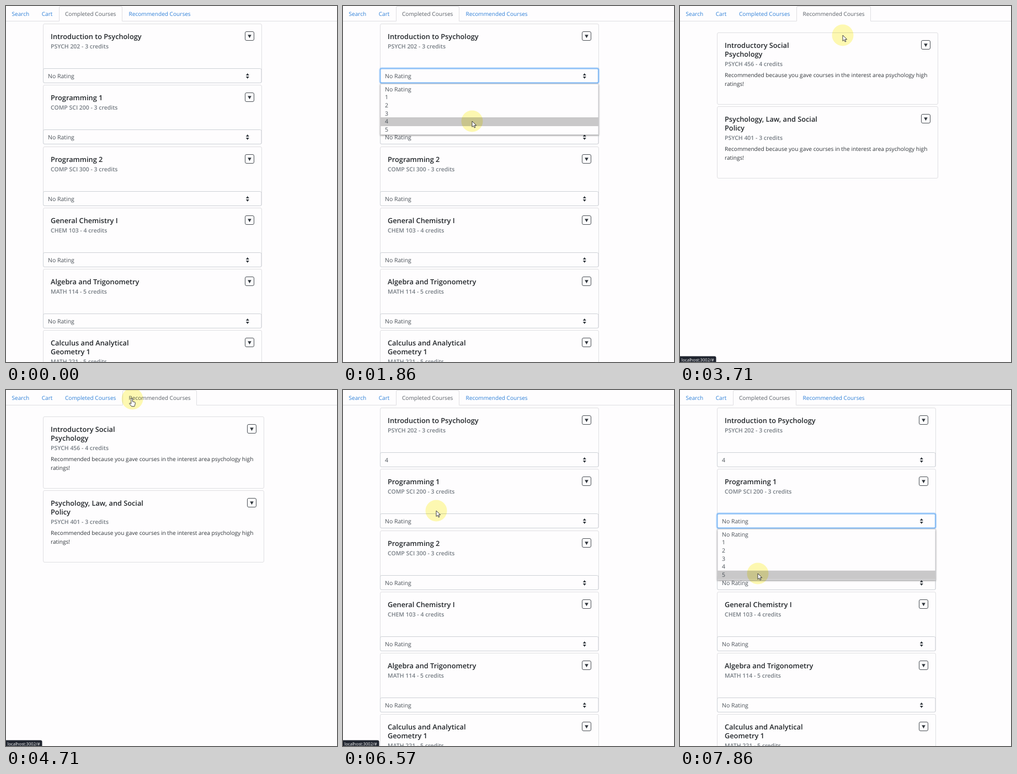
An HTML page for the animation above (8 s loop, 600 by 646 pixels).

```html
<!DOCTYPE html>
<html lang="en">
<head>
<meta charset="utf-8">
<title>Course planner</title>
<style>
  html, body { margin: 0; width: 100%; height: 100%; overflow: hidden; background: #fefdfe; }
  svg { display: block; width: 100%; height: 100%; }
  text { font: 10.5px "Open Sans", "Noto Sans", sans-serif; fill: #495057; text-rendering: geometricPrecision; white-space: pre; }
  .title { font-size: 12.75px; font-weight: 600; fill: #212529; }
  .sub { font-size: 10.48px; font-weight: 600; fill: #747b82; }
  .body { font-size: 10.15px; fill: #30353a; }
  .tab { font-size: 10.1px; fill: #2f80d8; }
  .tab.on { fill: #5a6067; }
  .status { font-size: 7.65px; fill: #fff; }
  .box { fill: none; stroke: #dfdfe2; }
  .select { fill: #fefdfe; stroke: #cdd1d6; }
  .raised { fill: #fefdfe; stroke: #cfcfd2; filter: url(#shadow); }
  .dark { fill: #343a40; }
  .bubble { fill: #20252f; }
  .btn { fill: none; stroke: #4a4f55; }
  .focus { fill: none; stroke: #7db9f5; stroke-width: 1.4; }
  .glow { fill: none; stroke: #2f8cf5; stroke-opacity: .3; stroke-width: 3.4; }
  .spot { fill: #fefab2; mix-blend-mode: multiply; }
  .ring { fill: none; stroke: #e5403c; stroke-width: 2.6; }
  .pointer { fill: #fff; stroke: #2a2a2a; stroke-width: .9; stroke-linejoin: round; }
</style>
</head>
<body>
<svg id="stage" viewBox="0 0 600 646">
  <defs>
    <filter id="shadow" x="-5%" y="-15%" width="110%" height="130%">
      <feDropShadow dx="0" dy="1" stdDeviation="1.8" flood-color="#000" flood-opacity=".45"/>
    </filter>
  </defs>
</svg>
<script>
const STEP = 1000 / 7, STEPS = 56, PITCH = 111.25, ROW = 14.7;

const courses = [
  [['Introduction to Psychology'], 'PSYCH 202 - 3 credits'],
  [['Programming 1'], 'COMP SCI 200 - 3 credits'],
  [['Programming 2'], 'COMP SCI 300 - 3 credits'],
  [['General Chemistry I'], 'CHEM 103 - 4 credits'],
  [['Algebra and Trigonometry'], 'MATH 114 - 5 credits'],
  [['Calculus and Analytical', 'Geometry 1'], 'MATH 221 - 5 credits']
];
const picks = [
  [['Introductory Social', 'Psychology'], 'PSYCH 456 - 4 credits'],
  [['Psychology, Law, and Social', 'Policy'], 'PSYCH 401 - 3 credits']
];
const ratings = ['No Rating', '1', '2', '3', '4', '5'];

// Pointer path: step, x, y
const path = [
  [1, 515, 8], [2, 508, 150], [3, 465, 340], [4, 405, 500], [5, 375, 430],
  [6, 350, 310], [7, 329, 185], [8, 325, 121], [9, 325, 121], [11, 272, 178],
  [13, 234, 209], [16, 230, 209], [17, 226, 250], [18, 222, 281], [19, 222, 281],
  [20, 218, 149], [21, 232, 80], [22, 252, 24], [23, 260, 16], [25, 260, 16],
  [27, 330, 90], [29, 491, 150], [31, 350, 60], [32, 255, 22], [33, 229, 16],
  [35, 212, 16], [37, 186, 20], [39, 181, 37], [40, 178, 24], [43, 177, 23],
  [44, 176, 52], [45, 172, 124], [46, 169, 219], [48, 155, 243], [51, 150, 247],
  [52, 144, 300], [53, 141, 333], [55, 141, 333]
];
const clicks = [8, 15, 24, 41, 49];

const stage = document.getElementById('stage');

function add(parent, tag, attrs = {}, content) {
  const el = document.createElementNS('http://www.w3.org/2000/svg', tag);
  for (const key in attrs) el.setAttribute(key, attrs[key]);
  if (content) el.textContent = content;
  return parent.appendChild(el);
}
const group = (parent, y = 0) => add(parent, 'g', { transform: `translate(0 ${y})` });
const text = (p, cls, x, y, s) => add(p, 'text', { class: cls, x, y }, s);
const rect = (p, cls, x, y, width, height, rx = 0) =>
  add(p, 'rect', { class: cls, x, y, width, height, rx });
const shape = (p, cls, d) => add(p, 'path', { class: cls, d });
const show = (el, on) => { el.style.display = on ? '' : 'none'; };
const within = (k, a, b) => k >= a && k < b;

function heading(p, [lines, sub], y, buttonX) {
  lines.forEach((s, i) => text(p, 'title', 81, y + 16 * i, s));
  text(p, 'sub', 81, y + 17.5 + 16 * (lines.length - 1), sub);
  rect(p, 'btn', buttonX - 8, y - 13, 16, 16, 2.5);
  shape(p, 'dark', `M${buttonX - 3.3} ${y - 7.2}h6.6l-3.3 6z`);
}

function makeTabs(parent, active) {
  const [a, b] = active === 2 ? [96.5, 210.5] : [211.5, 345.5];
  shape(parent, 'box', `M0 27.5H${a}V3q0-2.5 2.5-2.5H${b - 2.5}q2.5 0 2.5 2.5V27.5H600`);
  [['Search', 10.5], ['Cart', 64.7], ['Completed Courses', 107], ['Recommended Courses', 222.5]]
    .forEach(([s, x], i) => text(parent, i === active ? 'tab on' : 'tab', x, 18.2, s));
}

function makeCourse(parent, course, i) {
  const g = group(parent, Math.round(PITCH * i));
  rect(g, 'box', 67.5, 32.5, 396, 107, 2.5);
  rect(g, 'select', 67.5, 113.5, 395.5, 26, 2.5);
  const value = text(g, '', 76, 130.7, ratings[0]);
  shape(g, 'dark', 'M434.8 126l3-4 3 4zM434.8 128l3 4 3-4z');
  const focus = group(g);
  rect(focus, 'glow', 67, 113, 396.5, 27, 3);
  rect(focus, 'focus', 67.5, 113.5, 395.5, 26, 2.5);
  const hover = group(g);
  rect(hover, 'raised', 67.5, 32.5, 396, 88.5, 2.5);
  shape(hover, 'box', 'M68 114.5H463');
  heading(g, course, 59.5, 441.5);
  return { value, focus, hover };
}

const completed = group(stage);
makeTabs(completed, 2);
const cards = courses.map((c, i) => makeCourse(completed, c, i));

const recommended = group(stage);
makeTabs(recommended, 3);
picks.forEach((c, i) => {
  const g = group(recommended, 134 * i);
  rect(g, 'box', 67.5, 48.5, 400, 130, 2.5);
  heading(g, c, 75.5, 445.5);
  text(g, 'body', 81, 129, 'Recommended because you gave courses in the interest area psychology high');
  text(g, 'body', 81, 145, 'ratings!');
});

const popup = group(stage);
rect(popup, 'raised', 68, 141.5, 395, 92);
const marker = add(popup, 'rect', { x: 68, width: 395, height: 16, fill: '#c9c8c9' });
ratings.forEach((s, i) => text(popup, '', 76, 154.6 + ROW * i, s));

const status = group(stage);
shape(status, 'bubble', 'M0 635.5H62.5q3 0 3 3V646H0z');
text(status, 'status', 2.5, 644.7, 'localhost:3002/#');

const spot = add(stage, 'circle', { class: 'spot', r: 19.5 });
const pointer = group(stage);
const ring = add(pointer, 'circle', { class: 'ring', r: 4.4 });
const arrow = shape(pointer, 'pointer', 'M0 0v10.5l2.5-2.3 1.7 3.8 1.7-.8-1.7-3.6h3.5z');
const hand = shape(pointer, 'pointer',
  'M-2.2 9V.3a1.3 1.3 0 0 1 2.6 0V5l3.6.8q1.5.4 1.3 2l-.6 3.4-1 2.6h-5L-5 9.3q-.8-1.7.9-1.7z');

function position(k) {
  const n = path.findIndex(p => p[0] >= k);
  const b = path[n], a = path[Math.max(0, n - 1)];
  const f = b[0] === a[0] ? 0 : (k - a[0]) / (b[0] - a[0]);
  return [a[1] + (b[1] - a[1]) * f, a[2] + (b[2] - a[2]) * f];
}

// The raised card trails the pointer by one step.
function hovered(k) {
  if (k < 2 || within(k, 9, 21) || k >= 49) return -1;
  const [x, y] = position(k - 1);
  const i = Math.floor((y - 32) / PITCH);
  return x > 67 && x < 464 && y > 32 && y - 32 - i * PITCH < 81 ? i : -1;
}

function draw(k) {
  const onPicks = within(k, 25, 42);
  show(recommended, onPicks);
  show(completed, !onPicks);
  show(status, within(k, 22, 28) || within(k, 32, 47));

  const focused = within(k, 9, 24) ? 0 : k >= 49 ? 1 : -1;
  const raised = hovered(k);
  cards.forEach((c, i) => {
    show(c.focus, i === focused);
    show(c.hover, i === raised);
  });
  cards[0].value.textContent = ratings[k >= 16 ? 4 : 0];

  const [x, y] = position(k);
  const open = within(k, 9, 16) ? 0 : k >= 50 ? 1 : -1;
  show(popup, open >= 0);
  if (open >= 0) {
    const top = 111 * open;
    const row = Math.max(0, Math.min(5, Math.round((y - 151 - top) / ROW)));
    popup.setAttribute('transform', `translate(0 ${top})`);
    marker.setAttribute('y', 143.2 + ROW * row);
  }

  for (const el of [spot, pointer]) {
    show(el, k > 0);
    el.setAttribute('transform', `translate(${x} ${y})`);
  }
  const link = y < 27 && x < 346;
  show(hand, link);
  show(arrow, !link);
  show(ring, clicks.includes(k));
}

let last = -1;
const start = performance.now();
function tick(now) {
  const t = Math.max(0, now - start) % (STEP * STEPS);
  const k = Math.floor((t + 6) / STEP) % STEPS;
  if (k !== last) draw(last = k);
  requestAnimationFrame(tick);
}
draw(0);
requestAnimationFrame(tick);
</script>
</body>
</html>
```
